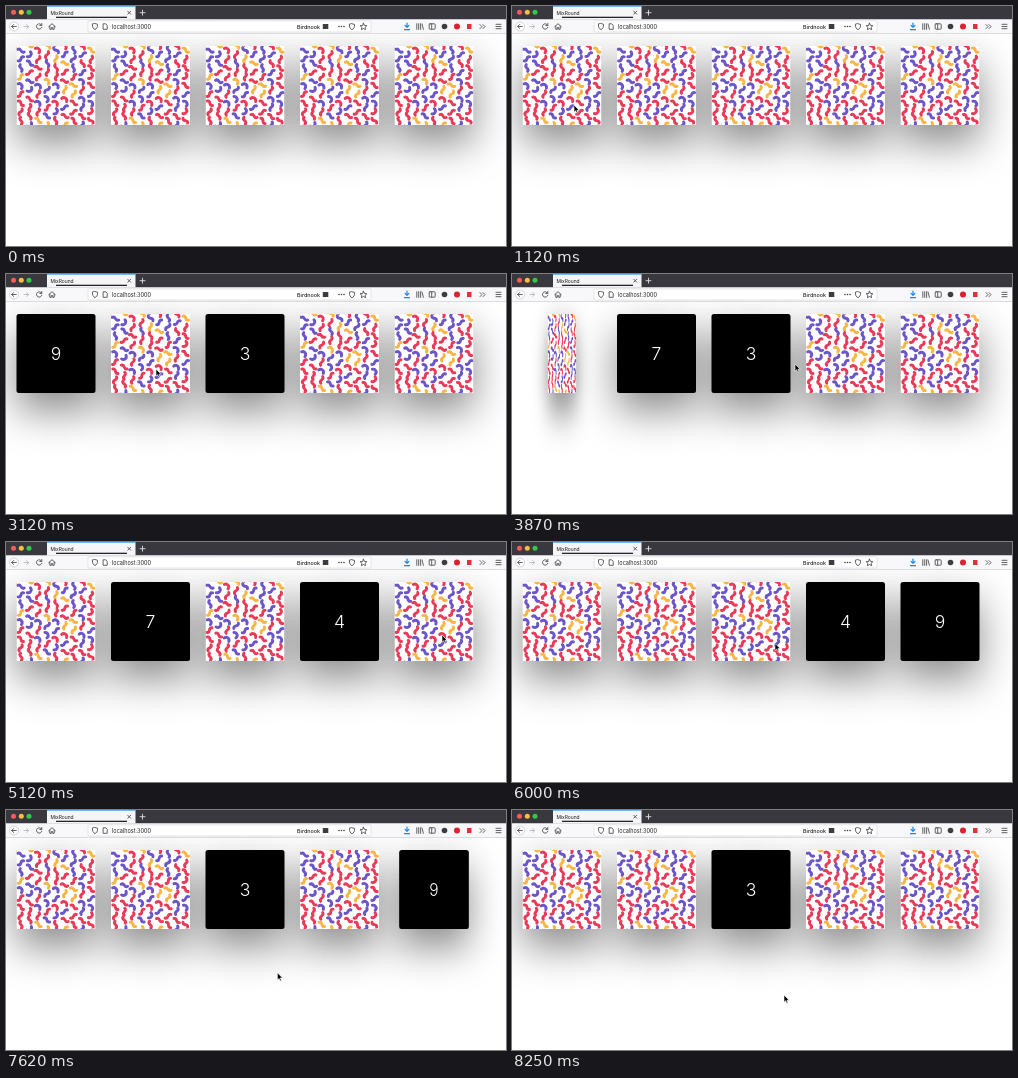
Animation of 500x240 px, one loop 8380 ms. Source, as an HTML page:

```html
<!DOCTYPE html>
<html lang="en">
<head>
<meta charset="utf-8">
<title>Memory cards</title>
<style>
  html, body { margin: 0; width: 100%; height: 100%; overflow: hidden; background: #fff; }
  svg { display: block; width: 500px; height: 240px; font-family: Inter, "Liberation Sans", sans-serif; }
  .icon { fill: none; stroke: #45454b; stroke-width: .85; stroke-linecap: round; stroke-linejoin: round; }
  .digit { font-size: 17.500px; font-weight: 300; fill: #fff; text-anchor: middle; }
  .worm { fill: none; stroke-width: 2.9; stroke-linecap: round; }
</style>
</head>
<body>
<svg viewBox="0 0 500 240">
  <defs>
    <filter id="blur" x="-90%" y="-90%" width="280%" height="280%" color-interpolation-filters="sRGB">
      <feGaussianBlur stdDeviation="20"/>
    </filter>
    <clipPath id="face"><rect x="-39.5" y="-39.5" width="79" height="79" rx="1"/></clipPath>
    <g id="back" clip-path="url(#face)">
      <rect x="-39.5" y="-39.5" width="79" height="79" fill="#fff"/>
      <g id="worms"></g>
    </g>
  </defs>

  <g id="shadows"></g>
  <g id="cards"></g>

  <g id="tabs">
    <rect width="500" height="13.5" fill="#39383e"/>
    <circle cx="7.5" cy="6.3" r="2.5" fill="#fc5b57"/>
    <circle cx="15.3" cy="6.3" r="2.5" fill="#fdbc40"/>
    <circle cx="23" cy="6.3" r="2.5" fill="#34c84a"/>
    <rect x="41" width="88.500" height="13.5" fill="#f6f6f8"/>
    <rect x="41" width="88.500" height=".6" fill="#2a8cf0"/>
    <rect x="50" y="10.700" width="71" height="1.300" fill="#25252b"/>
    <text x="44.500" y="8.700" font-size="4.900" fill="#18181c">MixRound</text>
    <path class="icon" d="M121.700 5.200l3 3m0-3l-3 3"/>
    <path class="icon" style="stroke:#e8e8ec" d="M134 6.700h5m-2.500-2.500v5"/>
  </g>

  <g id="toolbar">
    <rect y="13.500" width="500" height="14" fill="#f8f8fa"/>
    <rect y="27" width="500" height=".6" fill="#c9c9ce"/>
    <rect x="82" y="14.800" width="283" height="11.200" rx="1.200" fill="#fff" stroke="#d4d4d8" stroke-width=".6"/>
    <circle cx="8" cy="20.500" r="4.500" fill="#fff" stroke="#bcbcc2" stroke-width=".6"/>
    <g class="icon">
      <path d="M10.300 20.500h-4.600m2-2l-2 2 2 2"/>
      <path stroke="#b4b4ba" d="M18 20.500h4.600m-2-2l2 2-2 2"/>
      <path d="M35.500 19a2.700 2.700 0 1 0 .3 2.300M35.800 17.500v2h-2"/>
      <path d="M42.700 20.700l3.300-3 3.300 3M43.800 20.300v3h1.500v-1.700h1.400v1.700h1.500v-3"/>
      <path d="M89 17.500l2.600 .8c0 3-.7 4.300-2.600 5.300-1.900-1-2.600-2.300-2.600-5.300z"/>
      <path d="M97.500 17.800h2.200l1.500 1.500v4h-3.700z"/>
      <path d="M346 17.700l2.600 .8c0 3-.7 4.200-2.600 5.200-1.900-1-2.600-2.200-2.600-5.200z"/>
      <path d="M357.500 17.200l1 2.200 2.400 .3-1.800 1.600 .5 2.400-2.100-1.200-2.100 1.200 .5-2.400-1.800-1.600 2.400-.3z"/>
      <path stroke="#1684f2" stroke-width="1.200" d="M401 17v4.300m-2-2l2 2 2-2M398.500 23.700h5"/>
      <path d="M410.800 17.700v5.700M412.700 17.700v5.700M414.600 17.700v5.700M416 18l1.400 5.300"/>
      <rect x="423.200" y="17.800" width="6" height="5.400" rx=".8"/>
      <path d="M425.700 18v5"/>
      <path d="M474 18.600l2 2-2 2m3-4l2 2-2 2"/>
      <path d="M490 18.300h5m-5 2.200h5m-5 2.200h5"/>
    </g>
    <g fill="#3c3c42">
      <circle cx="333" cy="20.500" r=".8"/><circle cx="335.500" cy="20.500" r=".8"/><circle cx="338" cy="20.500" r=".8"/>
      <rect x="316.800" y="18" width="5.500" height="5"/>
      <circle cx="438.500" cy="20.500" r="2.800"/>
    </g>
    <circle cx="451" cy="20.500" r="3" fill="#d9232e"/>
    <rect x="461" y="18" width="4.500" height="5" fill="#e0323c"/>
    <text x="106" y="22.700" font-size="5.500" fill="#222226">localhost:3000</text>
    <text x="291" y="22.600" font-size="5.400" font-weight="500" fill="#222226">Birdnook</text>
  </g>

  <path id="cursor" d="M0 0v7.200l1.700-1.500 1.100 2.500 1.200-.5-1.100-2.500h2.300z" fill="#000" stroke="#fff" stroke-width=".6"/>
</svg>

<script>
const LOOP = 8380, STEP = 125, FLIP = 500, HOLD = 2300;
const $ = id => document.getElementById(id);

function add(parent, tag, attrs, text = '') {
  const node = document.createElementNS('http://www.w3.org/2000/svg', tag);
  for (const name in attrs) node.setAttribute(name, attrs[name]);
  node.textContent = text;
  return parent.appendChild(node);
}

// Basket weave of short bent strokes, loosened by seeded jitter.
function drawWorms() {
  let seed = 29;
  const random = () => (seed = seed * 16807 % 2147483647) / 2147483647;
  const spread = amount => (random() - .5) * amount;
  const pick = list => list[Math.floor(random() * list.length)];
  const colors = ['#6b55c8', '#ea3a58', '#f9b545', '#6b55c8', '#ea3a58'];
  const shapes = [
    'M-3.300 1C-1.600-3 1.600 3 3.300-1',
    'M-2.900 1.100C-2-1.900 2-1.900 2.900 1.100',
    'M-3.300-1C-1.600 3 1.600-3 3.300 1'
  ];
  const cell = 8.8;
  for (let row = -5; row <= 5; row++) {
    for (let col = -5; col <= 5; col++) {
      const odd = Math.abs(row + col) % 2;
      const turn = (odd ? 130 : 50) + spread(40);
      const x = col * cell + spread(.8);
      const y = row * cell + (col % 2 ? cell / 2 : 0) + spread(.8);
      add($('worms'), 'path', {
        class: 'worm', d: pick(shapes), stroke: pick(colors),
        transform: `translate(${x} ${y}) rotate(${turn})`
      });
    }
  }
}

const deck = [
  { digit: 9, opens: [1285] },
  { digit: 7, opens: [3100] },
  { digit: 3, opens: [2330, 6250] },
  { digit: 4, opens: [4060] },
  { digit: 9, opens: [5200] }
];

function buildCard(card, index) {
  card.x = 50 + index * 94.5;
  card.shadow = add($('shadows'), 'g', {});
  add(card.shadow, 'rect', {
    x: -39.5, y: -21.5, width: 79, height: 79, 'fill-opacity': .46, filter: 'url(#blur)'
  });
  card.body = add($('cards'), 'g', {});
  card.back = add(card.body, 'use', { href: '#back' });
  card.front = add(card.body, 'g', {});
  add(card.front, 'rect', { x: -39.5, y: -39.5, width: 79, height: 79, rx: 2.5 });
  add(card.front, 'text', { class: 'digit', y: 6.4 }, card.digit);
}

// Time, x and y of each stop of the pointer.
const path = [
  [125, 219, 214], [375, 210, 205], [1000, 62, 99], [1375, 62, 99],
  [2250, 227, 97], [2450, 227, 97], [3000, 150, 95], [3250, 150, 95],
  [3875, 283, 90], [4050, 320, 92], [4400, 335, 92], [5000, 436, 93],
  [5350, 436, 93], [6125, 250, 102], [6400, 250, 102], [6875, 270, 112],
  [7150, 270, 112], [7900, 272, 185], [8380, 272, 185]
];

const ease = p => {
  p = Math.min(1, Math.max(0, p));
  return p * p * (3 - 2 * p);
};

function poseCard(card, time) {
  const turn = card.opens.reduce((sum, open) =>
    sum + ease((time - open) / FLIP) - ease((time - open - HOLD) / FLIP), 0);
  const facing = Math.cos(turn * Math.PI);
  const width = Math.max(.01, Math.abs(facing));
  const pose = `translate(${card.x} 79.5) scale(${width} 1)`;
  card.body.setAttribute('transform', pose);
  card.shadow.setAttribute('transform', pose);
  card.back.style.display = facing >= 0 ? '' : 'none';
  card.front.style.display = facing < 0 ? '' : 'none';
}

function poseCursor(time) {
  const next = path.findIndex(stop => stop[0] > time);
  $('cursor').style.display = next > 0 ? '' : 'none';
  if (next < 1) return;
  const [t0, x0, y0] = path[next - 1], [t1, x1, y1] = path[next];
  const p = ease((time - t0) / (t1 - t0));
  $('cursor').setAttribute('transform', `translate(${x0 + (x1 - x0) * p} ${y0 + (y1 - y0) * p})`);
}

function render(elapsed) {
  const time = Math.min(66, Math.floor((elapsed % LOOP + 5) / STEP)) * STEP;
  deck.forEach(card => poseCard(card, time));
  poseCursor(time);
}

drawWorms();
deck.forEach(buildCard);
render(0);
const start = performance.now();
requestAnimationFrame(function tick() {
  render(performance.now() - start);
  requestAnimationFrame(tick);
});
</script>
</body>
</html>
```
